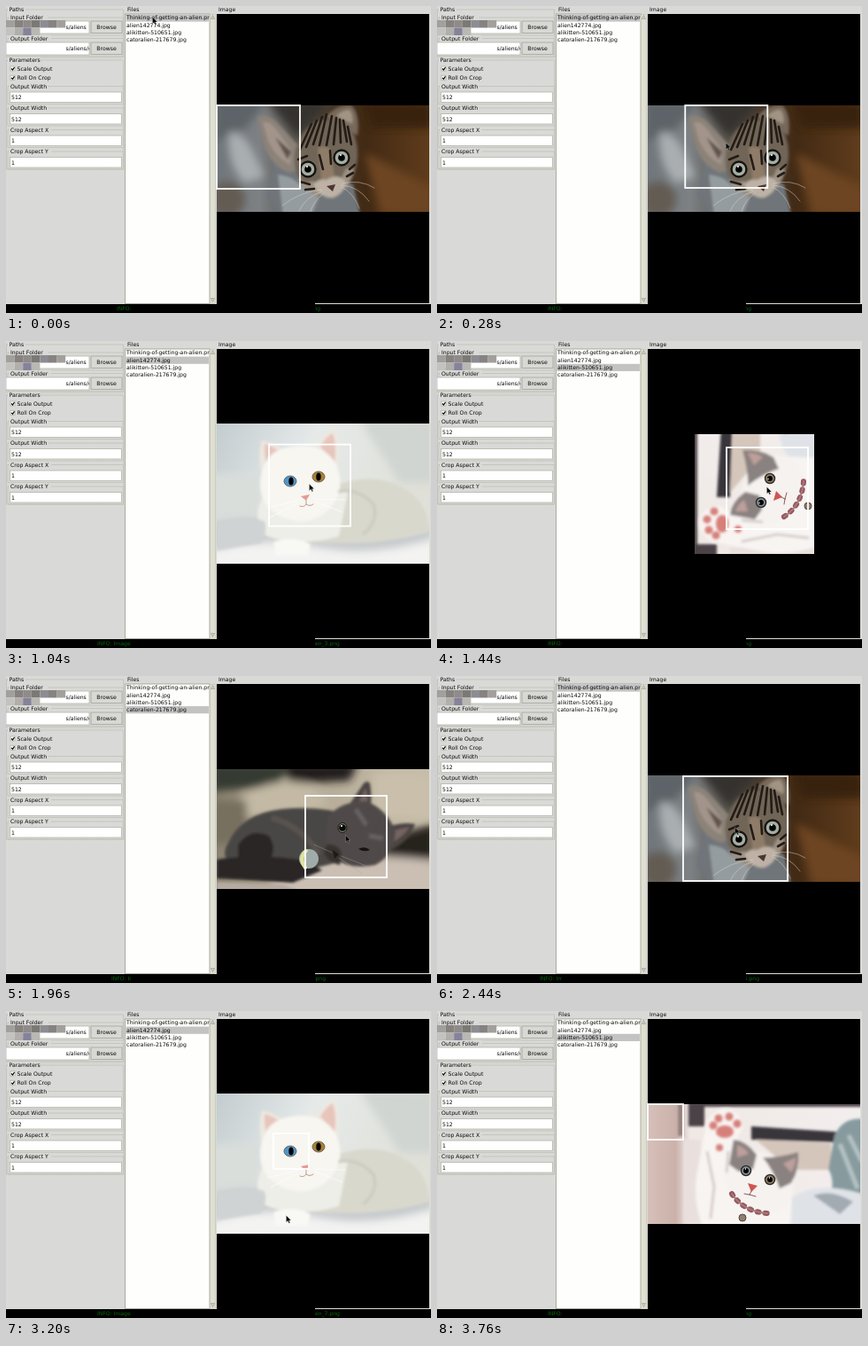
An HTML page for the animation above (3.92 s loop, 480 by 346 pixels).

```html
<!DOCTYPE html>
<html lang="en">
<head>
<meta charset="utf-8">
<title>Image cropper</title>
<style>
  html, body { margin: 0; width: 100%; height: 100%; overflow: hidden; background: #000; }
  svg { display: block; }
  #stage { width: 480px; height: 346px; }
  text { font-family: "DejaVu Sans", sans-serif; font-size: 6.15px; fill: #080808; text-rendering: geometricPrecision; }
  #status text { fill: #0a650d; font-size: 6.1px; }
  .fur { fill: none; stroke-linecap: round; stroke-linejoin: round; }
</style>
</head>
<body>
<svg id="stage" viewBox="0 0 480 346">
  <defs>
    <filter id="soft" x="-40%" y="-40%" width="180%" height="180%"><feGaussianBlur stdDeviation="5"/></filter>
    <filter id="fuzz" x="-20%" y="-20%" width="140%" height="140%"><feGaussianBlur stdDeviation="1.5"/></filter>
    <linearGradient id="wood">
      <stop offset="0" stop-color="#70777c"/><stop offset=".2" stop-color="#7d8184"/>
      <stop offset=".45" stop-color="#4b4238"/><stop offset=".7" stop-color="#422a14"/><stop offset="1" stop-color="#5f3c1c"/>
    </linearGradient>
    <linearGradient id="snow" x2="1" y2=".3">
      <stop offset="0" stop-color="#c3cccf"/><stop offset=".45" stop-color="#e6eae9"/><stop offset="1" stop-color="#dfe0d8"/>
    </linearGradient>
    <linearGradient id="wall">
      <stop offset="0" stop-color="#d6c0b9"/><stop offset=".13" stop-color="#cbb1aa"/>
      <stop offset=".2" stop-color="#efe8e4"/><stop offset="1" stop-color="#f3eeee"/>
    </linearGradient>
    <linearGradient id="sofa">
      <stop offset="0" stop-color="#8b8270"/><stop offset=".4" stop-color="#b3a995"/><stop offset="1" stop-color="#c6bda9"/>
    </linearGradient>
    <clipPath id="listClip"><rect x="135" y="9" width="94.500" height="326"/></clipPath>
    <clipPath id="pathClip"><rect y="9" width="94" height="50"/></clipPath>
  </defs>

  <rect width="480" height="336" fill="#d9d9d7"/>
  <g id="form"></g>
  <text x="137" y="6.300">Files</text>
  <text x="240" y="6.300">Image</text>

  <rect x="134.500" y="9" width="95.500" height="326.500" fill="#fefefc" stroke="#99998c" stroke-width=".8"/>
  <rect id="pick" x="135.500" width="93.500" height="8.200" fill="#c3c3c3"/>
  <g id="list" clip-path="url(#listClip)"></g>
  <rect x="230.500" y="9.500" width="6" height="326" fill="#dfdfd2" stroke="#c2c2b2" stroke-width=".6"/>
  <path d="M231.500 14.500l2-4 2 4zM231.500 329.500l2 4 2-4z" fill="#d0d0c8" stroke="#88887c" stroke-width=".5"/>
  <rect x="238" y="9" width="240" height="327"/>

  <svg class="photo" x="238" y="112" width="240" height="120" viewBox="238 112 240 120">
    <rect x="238" y="112" width="240" height="120" fill="url(#wood)"/>
    <g filter="url(#soft)">
      <path d="M235 108h60l-25 30-35 15z" fill="#5d6467"/>
      <path d="M252 142q18 0 28 25l12 25-22 8q-22-23-18-58z" fill="#a9afb1"/>
      <ellipse cx="250" cy="218" rx="20" ry="20" fill="#635c52"/>
      <path d="M402 108h80v30h-70z" fill="#38220f"/>
      <path d="M405 165l78 40v30h-60z" fill="#6d4521"/>
      <path d="M295 108h70l-35 40z" fill="#34332f"/>
    </g>
    <path d="M302 176l30 5 60 20 8 34h-92l-14-22z" fill="#6f757a" filter="url(#fuzz)"/>
    <g filter="url(#fuzz)">
      <path d="M284 126q10-7 22 5l24 26 8 25-18 6q-22-8-29-33z" fill="#8b8278"/>
      <path d="M290 131q8-2 16 9l16 22-1 17q-16-8-25-27z" fill="#a2948b"/>
      <path d="M304 148l14 25 4-9z" fill="#5e534b"/>
      <path d="M361 125q14-15 29-13 10 9 7 34l-18-10z" fill="#77695a"/>
      <path d="M373 124q8-8 15-7 5 7 3 16z" fill="#a29484"/>
      <path d="M327 161q8-26 30-33 26-1 37 19 8 25-4 49-12 19-30 18-21-6-32-24-4-16-1-29z" fill="#706557"/>
      <path d="M352 160q9-4 14 2l6 35-15 6z" fill="#8f7c67"/>
      <path d="M330 194q6 8 17 3l9 12-4 8q-17-5-22-23zM384 183q8-1 9 3l-8 20-8-8z" fill="#9c9184"/>
      <path d="M347 201q7-7 15-5 12-8 21 1 2 12-13 19-14 2-23-15z" fill="#bdb2a5"/>
      <path d="M307 190q16 1 25 12l21 14-8 20h-32z" fill="#959c9f"/>
    </g>
    <path class="fur" stroke="#231c16" stroke-width="2.600" d="M332 162l13-29M339 159l12-30M347 156l10-31M354 157l8-35M362 157l6-33M370 156l3-30M378 154l-1-26M385 153l-4-24M390 156l-4-20M330 173l10-4M354 168l4 16M366 163l1 15M388 184l6-5M385 192l7-4M332 198l11 3M338 207l10-1"/>
    <g fill="#a3aea3" stroke="#17130f" stroke-width="2.400">
      <circle cx="341" cy="184" r="8.500"/><circle cx="379" cy="171" r="8.500"/>
    </g>
    <circle cx="341" cy="184" r="3.800"/><circle cx="379" cy="171" r="3.800"/>
    <path d="M339 181h2M377 168h2" stroke="#fff" stroke-width="1.500"/>
    <path d="M362 203l10-2-3 8z" fill="#4c352f"/>
    <path class="fur" stroke="#d8d2c9" stroke-width=".5" d="M357 207q-25 2-45 18M357 209q-19 6-26 22M359 211q-11 8-15 20M379 202q19 1 31 18M379 204q14 7 20 24M380 200q20-5 36 5"/>
  </svg>

  <svg class="photo" x="238" y="93" width="240" height="158" viewBox="238 93 240 158">
    <rect x="238" y="93" width="240" height="158" fill="url(#snow)"/>
    <g filter="url(#soft)">
      <path d="M232 150h55v65h-55z" fill="#d9dedb"/>
      <path d="M400 90h85v70h-40z" fill="#d0d5d1"/>
      <path d="M232 205q65-10 105 10t145-4v45H232z" fill="#c4c8ca"/>
      <path d="M230 237q55-18 120-5t135-10v34H230z" fill="#f3f3f2"/>
    </g>
    <g filter="url(#fuzz)">
      <path d="M374 162q45-16 81 7 24 19 22 46-45 14-105 12-58 4-89-22l8-32z" fill="#d9d8cd"/>
      <path d="M291 175q-15 26 3 45 37 13 82 0l10-50z" fill="#eeeee8"/>
      <path d="M238 206q30-12 54-3 4 12-4 25l-50 8z" fill="#d0d3d4"/>
      <path d="M289 112q14 2 26 12l-16 25-10 2q-5-22 0-39zM348 119q12-18 23-21 8 17 4 42l-9 7z" fill="#ece8e1"/>
      <path d="M292 116q11 3 19 10l-15 20q-5-17-4-30zM355 119q8-13 14-15 5 15 2 33z" fill="#e7c5bb"/>
      <path d="M288 151q6-29 34-32 36-6 51 20 11 27-5 47-16 19-40 17-27-4-38-25-5-13-2-27z" fill="#f7f6f1"/>
      <path d="M375 170q22-5 40 14 6 20-12 34" fill="none" stroke="#cbcabf" stroke-width="3"/>
      <path d="M302 227q21-9 42 2l-3 13h-36z" fill="#f8f8f4"/>
    </g>
    <ellipse cx="321" cy="158" rx="7" ry="6" fill="#4f97cb" stroke="#6b665f"/>
    <ellipse cx="353" cy="153" rx="7" ry="6" fill="#a98033" stroke="#6b665f"/>
    <ellipse cx="322" cy="158" rx="2.700" ry="4.500"/><ellipse cx="353" cy="153" rx="2.700" ry="4.500"/>
    <path d="M333 175l10-2-4 7z" fill="#e59a96"/>
    <path class="fur" stroke="#c29b93" stroke-width="1" d="M339 180v4q-3 4-7 2M339 184q4 3 8 0"/>
    <path class="fur" stroke="#fff" stroke-width=".6" d="M329 180l-34 8M329 183l-31 16M349 178l34 1M349 181l31 12"/>
  </svg>

  <svg class="photo" x="238" y="105" width="240" height="135" viewBox="238 105 240 135">
    <g id="roll"><svg x="238" y="105" width="240" height="135" viewBox="238 105 240 135">
      <rect x="238" y="105" width="240" height="135" fill="url(#wall)"/>
      <g filter="url(#fuzz)">
        <path d="M272 103h6v38h-6z" fill="#94807b"/>
        <path d="M284 103h196v5H302v22h-18z" fill="#4b4246"/>
        <path d="M355 130l125 8v11l-125-4z" fill="#37343a"/>
        <path d="M360 145l85 4v30h-45z" fill="#d5c6bb"/>
        <path d="M278 145h20v95h-20z" fill="#e9e0de"/>
        <path d="M449 140q10-22 35-18v90h-42q9-18 0-34z" fill="#879b9f"/>
        <path d="M455 150l20 50M465 140l15 30" stroke="#b3c1c2" stroke-width="5"/>
        <path d="M398 212q30-22 82-6v36h-90z" fill="#dfe3e8"/>
        <path d="M425 208q20-8 45 7l-15 14z" fill="#a3abb2"/>
        <path d="M304 128q6-17 23-18 17 3 18 22l-9 17-4 27 24 25 45 5-2 41h-98q-13-35-7-66z" fill="#f7f4f2"/>
        <path d="M324 185l12-39q14 5 22 11l28 8 22-4q2 14-6 26 4 24-13 36-28 14-51-8-14-17-14-30z" fill="#f5f2f0"/>
        <path d="M335 145q15 2 26 17l-4 16-16 3-11-8zM368 165q15 1 40-6 2 17-8 35l-13 6q-6-19-19-35z" fill="#8a8280"/>
        <path d="M339 151q9 3 13 10l-13 4zM391 172l14-7q0 10-5 17z" fill="#bd9f9b"/>
        <path d="M305 158l8 40-4 36M329 158l-2 24" fill="none" stroke="#d5cccb" stroke-width="3"/>
      </g>
      <g fill="#d77f79" filter="url(#fuzz)">
        <ellipse cx="325" cy="136" rx="10" ry="7"/>
        <circle cx="312" cy="129" r="4.500"/><circle cx="318" cy="121" r="4.500"/>
        <circle cx="330" cy="119" r="4.500"/><circle cx="339" cy="127" r="4.500"/><circle cx="319" cy="154" r="4"/>
      </g>
      <g stroke="#332e2d" stroke-width="1.500">
        <circle cx="349" cy="180" r="5.500" fill="#87979b"/><circle cx="376" cy="190" r="5.500" fill="#968362"/>
      </g>
      <circle cx="349" cy="180" r="3"/><circle cx="376" cy="190" r="3"/>
      <path d="M348 178h1M375 188h1" stroke="#fff" stroke-width="1.500"/>
      <path d="M351 194l11 3-7 7z" fill="#cf5553"/>
      <path class="fur" stroke="#8d595b" stroke-width="1" d="M355 203l-2 4M353 207l-6-1M353 207l7 2"/>
      <path class="fur" stroke="#94585c" stroke-width="6" stroke-dasharray="2 7" d="M333 206q13 20 40 22"/>
      <path class="fur" stroke="#a9787a" stroke-width="2" d="M333 206q13 20 40 22"/>
      <circle cx="345" cy="233" r="4" fill="#8e806d" stroke="#50463d"/>
    </svg></g>
  </svg>

  <svg class="photo" x="238" y="105" width="240" height="135" viewBox="238 105 240 135">
    <rect x="238" y="105" width="240" height="135" fill="url(#sofa)"/>
    <g filter="url(#soft)">
      <path d="M232 98h92l-18 26-74 6z" fill="#363a30"/>
      <path d="M318 98h80l-10 20-70 4z" fill="#241f1a"/>
      <path d="M265 135q45-24 80-12l20 20-30 16h-70z" fill="#c3b9a4"/>
      <path d="M232 140h40v50h-40z" fill="#77705f"/>
      <path d="M415 110q40-10 70 12v38h-70z" fill="#c9bfaa"/>
      <path d="M430 182l55-16v46h-60z" fill="#28221e"/>
      <path d="M300 222q75-28 185-14v40H300z" fill="#cbbfb4"/>
    </g>
    <g filter="url(#fuzz)">
      <path d="M251 188q15-33 60-38 47-5 82 9l11 44-62 15-83-4q-19-9-8-26z" fill="#4a4644"/>
      <path d="M262 190q14-20 35-10 12 19-4 30l-31-3z" fill="#2a2726"/>
      <path d="M300 160q31 8 52 38l-20 17" fill="none" stroke="#59534f" stroke-width="6"/>
      <path d="M238 207q48-8 101 1l18 11-33 14-86-5z" fill="#2b2826"/>
      <path d="M238 232l75 3 20 8h-95z" fill="#b5aaa0"/>
      <path d="M389 143l15-22q4-4 7 0 3 17 0 32zM430 170q20-6 32-3-5 17-26 29z" fill="#4b4543"/>
      <path d="M398 143l8-17q4 9 1 24zM438 174l18-4q-6 10-19 17z" fill="#746461"/>
      <path d="M364 158q15-17 42-17 25 9 34 35-3 27-23 37-29 6-47-8-13-18-6-47z" fill="#4f4a48"/>
      <path d="M362 190q11-2 17 8l-2 15q-13-3-18-13z" fill="#39322f"/>
      <path d="M395 150l12 18M410 180l16 3" stroke="#666060" stroke-width="5"/>
    </g>
    <circle cx="342" cy="206" r="11" fill="#9facaa"/>
    <path class="fur" d="M339 197q-9 8-1 19" stroke="#e1e2a0" stroke-width="4"/>
    <ellipse cx="380" cy="171" rx="5" ry="5.500" fill="#77836a" stroke="#1a1818"/>
    <circle cx="380" cy="171" r="3.800" fill="#080808"/>
    <path d="M378 169h2" stroke="#fff" stroke-width="1.500"/>
    <path d="M398 195q7-4 13 1-6 3-13-1z" fill="#151313"/>
    <path d="M369 196l7 5-5 5z" fill="#1e1a1a"/>
    <path class="fur" stroke="#aaa49e" stroke-width=".4" d="M376 205l25 17M379 203l33 13M368 199l-20-9"/>
  </svg>

  <rect id="crop" fill="none" stroke="#fff" stroke-width="1.800"/>
  <path id="mouse" d="M0-3v7.500l1.800-1.600 1.300 2.800 1.200-.6-1.200-2.600 2.300-.1z" stroke="#ddd" stroke-width=".3"/>

  <rect y="336" width="480" height="10"/>
  <g id="status"><text y="343.300">INFO: Image</text><text y="343.300" text-anchor="end"></text></g>
  <rect x="141" y="336" width="208" height="10"/>
  <path d="M349 335.500h129.500V9" fill="none" stroke="#deded6" stroke-width="1"/>
</svg>

<script>
const LOOP = 3920, STEP = 40;
const $ = id => document.getElementById(id);
const files = [
  { stem: "Thinking-of-getting-an-alien", ext: ".png", top: 112, h: 120, half: 137 },
  { stem: "alien142774", ext: ".jpg", top: 93, h: 158, half: 115 },
  { stem: "alikitten-510651", ext: ".jpg", top: 105, h: 135, half: 121 },
  { stem: "catoralien-217679", ext: ".jpg", top: 105, h: 135, half: 124 }
];
// start time, shown file, last saved file, save number
const shots = [
  [0, 0, 1, 2], [560, 1, 0, 3], [1120, 2, 1, 4], [1680, 3, 2, 5],
  [2240, 0, 3, 6], [2800, 1, 0, 7], [3400, 2, 1, 8]
];
const path = [
  [0, 167, 16], [320, 335, 164], [560, 337, 170], [640, 332, 160], [1120, 345, 165],
  [1440, 374, 168], [1560, 374, 168], [1960, 385, 183], [2440, 338, 174], [2800, 336, 170],
  [3000, 323, 160], [3080, 323, 160], [3200, 318, 234], [3400, 318, 234], [3720, 205, 70]
];
const sizes = [[0, 94], [560, 92], [2240, 92], [2400, 118], [2800, 118], [3080, 40]];

const text = (x, y, s, more = "") => `<text x="${x}" y="${y}" ${more}>${s}</text>`;
const rect = (x, y, w, h, fill, stroke = "none") =>
  `<rect x="${x}" y="${y}" width="${w}" height="${h}" fill="${fill}" stroke="${stroke}" stroke-width=".8"/>`;

function group(label, x, y, h) {
  const w = 132.5 - x;
  return `<path d="M${x} ${y}h${w}v${h}h${-w}z" fill="none" stroke="#b4b4a8" stroke-width=".7" stroke-dasharray="1.500 .5"/>` +
    rect(x + 2, y - 3.5, label.length * 3.45 + 2, 7, "#d9d9d7") + text(x + 3, y + 2.2, label);
}
const entry = (x, y, w, h) => rect(x, y, w, h, "#fff", "#b4b4a8");
const button = y => rect(96, y, 35, 13.5, "#d8d8d4", "#a4a49a") +
  text(113.5, y + 9, "Browse", 'text-anchor="middle"');
const check = (y, label) => rect(5, y - 2.5, 5, 5, "#fff", "#b0b0a8") +
  `<path d="M6 ${y}l1.500 1.500 2-3" fill="none" stroke="#000" stroke-width="1.200"/>` + text(12.5, y + 2.3, label);

function buildForm() {
  let s = group("Paths", 0.5, 4, 54) + group("Input Folder", 2, 13, 20) + group("Output Folder", 2, 36.5, 20);
  s += entry(0, 17, 94, 14) + entry(0, 41, 94, 14) + button(17) + button(41);
  s += `<g clip-path="url(#pathClip)">${text(67.5, 26, "s/aliens")}${text(67.5, 50, "s/aliens/crops")}</g>`;
  const shades = ["a29f9c", "85827f", "8e8b89", "7c7975", "8d8c91", "858381", "a3a09c",
    "c4c2bf", "b1aeab", "85829a", "b9b8b2"];
  shades.forEach((c, i) => { s += rect(i % 7 * 9.6, 16 + (i > 6) * 8.5, 9.6, 8.5, "#" + c); });
  s += group("Parameters", 0.5, 61, 123) + check(70.5, "Scale Output") + check(80.8, "Roll On Crop");
  [["Output Width", 512], ["Output Width", 512], ["Crop Aspect X", 1], ["Crop Aspect Y", 1]].forEach(([label, v], i) => {
    const y = 90.5 + i * 24.5;
    s += group(label, 2, y, 20) + entry(4.5, y + 6.5, 126, 11.5) + text(6, y + 14.5, v);
  });
  $("form").innerHTML = s;
}

function track(keys, t) {
  const i = keys.findIndex(k => k[0] > t);
  if (i < 0) return keys[keys.length - 1].slice(1);
  const a = keys[i - 1], b = keys[i], u = (t - a[0]) / (b[0] - a[0]), e = u * u * (3 - 2 * u);
  return a.slice(1).map((v, j) => v + (b[j + 1] - v) * e);
}
const clamp = (v, lo, hi) => Math.max(lo, Math.min(hi, v));
const set = (el, attrs) => { for (const k in attrs) el.setAttribute(k, attrs[k]); };

buildForm();
$("list").innerHTML = files.map((f, i) => text(136, 15.4 + i * 8.2, f.stem + f.ext)).join("");
const photos = document.querySelectorAll(".photo");
const [info, saved] = $("status").children;

function render(t) {
  const [, cur, last, n] = shots.filter(s => s[0] <= t).pop();
  const f = files[cur], turned = t >= 1360 && t < 1680;
  photos.forEach((p, i) => { p.style.display = i === cur ? "" : "none"; });
  $("roll").setAttribute("transform", turned ? "rotate(-90 358.5 172.5)" : "");
  $("pick").setAttribute("y", 9.4 + cur * 8.2);

  // the crop box follows the pointer but stays inside the photo
  const [mx, my] = track(path, t), [size] = track(sizes, t);
  const [ax, ay] = t < 3400 ? track(path, Math.min(t, 3080)) : [mx, my];
  const left = turned ? 291 : 238, right = turned ? 426 : 478;
  set($("crop"), {
    x: clamp(ax - 1 - size / 2, left, right - size),
    y: clamp(ay - 2 - size / 2, f.top, f.top + f.h - size),
    width: size, height: size
  });
  $("mouse").setAttribute("transform", `translate(${mx - 1.5} ${my - 0.5})`);
  $("mouse").style.display = t < 3680 ? "" : "none";

  const { stem, half } = files[last];
  info.setAttribute("x", 240 - half);
  saved.setAttribute("x", 240 + half);
  saved.textContent = `${stem}_${n}.png`;
}

const start = performance.now();
function tick() {
  const t = (performance.now() - start) % LOOP;
  render(Math.floor(t / STEP) * STEP);
  requestAnimationFrame(tick);
}
tick();
</script>
</body>
</html>
```
